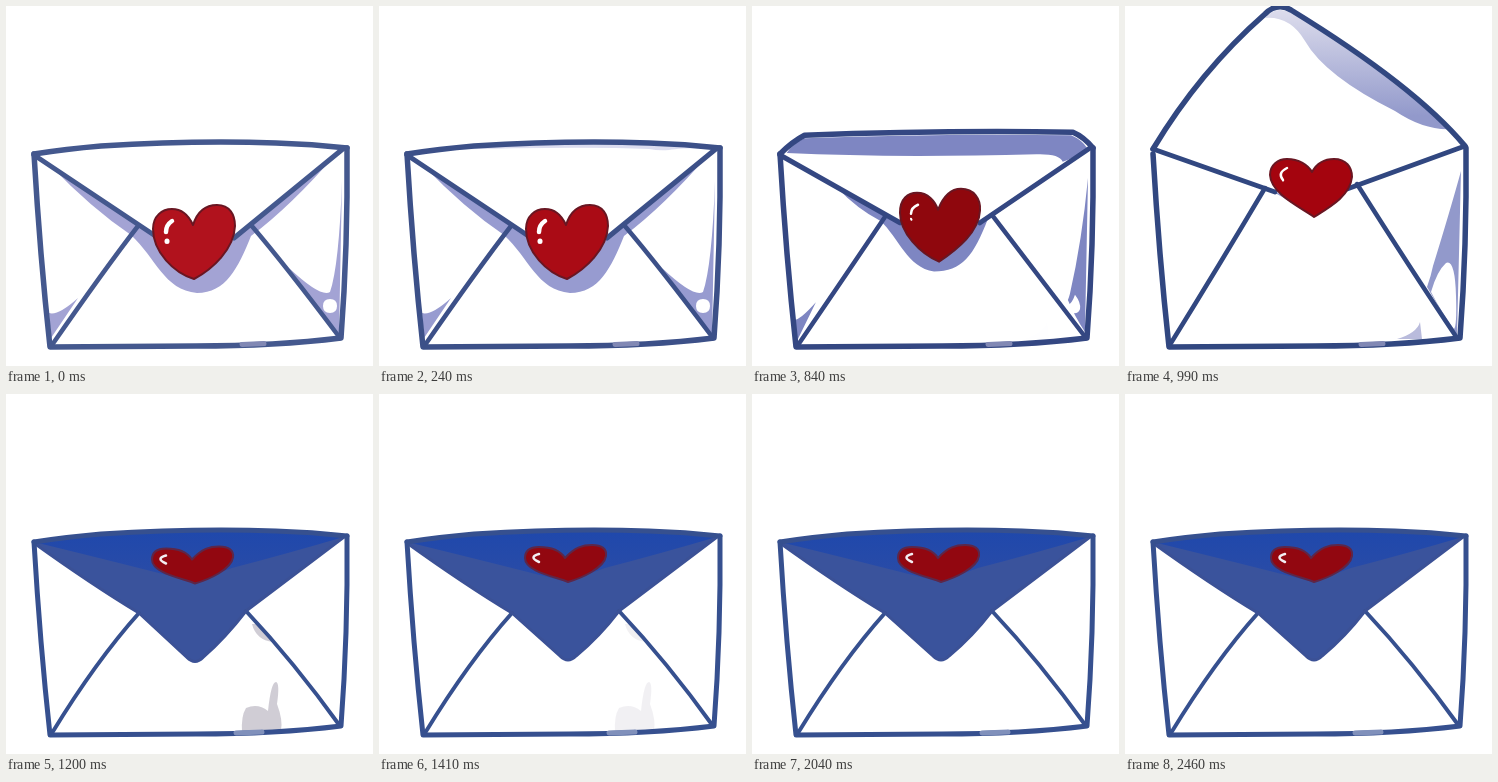
Animation, 367 px wide and 360 px high, one loop 2490 ms. Source, as an HTML page with a canvas:

```html
<!DOCTYPE html>
<html>
<head>
<meta charset="utf-8">
<style>
html, body { margin: 0; width: 100%; height: 100%; overflow: hidden; background: #fff; }
canvas { display: block; }
</style>
</head>
<body>
<canvas id="stage" width="367" height="360"></canvas>
<script>
const ctx = document.getElementById('stage').getContext('2d');
const LOOP = 2490, TURN = 1050;
ctx.lineCap = ctx.lineJoin = 'round';

// Blend every number in two strings of the same form.
function mix(a, b, p) {
  const to = b.match(/-?[\d.]+/g).map(Number);
  let i = 0;
  return a.replace(/-?[\d.]+/g, n => +(+n + (to[i++] - n) * p).toFixed(3));
}

function at(t, keys) {
  const next = keys.findIndex(k => k[0] > t);
  if (next < 0) return keys[keys.length - 1][1];
  if (!next) return keys[0][1];
  const [t0, a] = keys[next - 1], [t1, b] = keys[next];
  return mix(a, b, (t - t0) / (t1 - t0));
}

const pose = (shut, ajar, open) => [[775, shut], [840, ajar], [990, open]];
const tone = (first, late, ajar, open) => [[0, first], [540, late], [840, ajar], [990, open]];

const ink = tone('rgb(68,88,142)', 'rgb(51,70,128)', 'rgb(52,71,130)', 'rgb(49,71,128)');
const lilac = tone('rgb(163,163,212)', 'rgb(137,144,202)', 'rgb(126,134,194)', 'rgb(146,153,203)');
const red = tone('rgb(177,18,29)', 'rgb(162,3,12)', 'rgb(143,7,13)', 'rgb(164,4,14)');
const rim = 'rgb(105,22,34)';

const shutTop = 'M28 148Q60 143 95 140Q190 134 270 137Q306 138 341 142';
const topEdge = pose(
  shutTop,
  'M28 148Q40 136 52 130Q190 125 322 127Q332 131 341 142',
  'M28 143Q75 65 140 8Q152 -4 166 4Q290 80 340 140');
const inside = pose(
  'M60 144Q80 142 100 141Q190 137 270 139Q300 140 325 142Q300 142 290 144Q280 145 270 143Q200 140 60 144Z',
  'M34 148Q40 138 52 133Q190 128 320 130Q330 134 335 142Q320 154 311 156Q308 148 285 149Q140 153 34 148Z',
  'M140 12Q148 3 156 4Q165 5 180 14Q290 85 327 123Q300 125 270 105Q200 70 180 35Q165 10 140 12Z');
const flap = pose(
  'M28 149L148 229M338 142L228 232',
  'M28 149L148 217M338 142L228 217',
  'M28 143L150 186M340 140L222 183');
const flapShade = pose(
  'M45 160L148 229L188 250L228 232L330 148Q285 200 245 230C232 262 220 287 191 287C158 284 150 252 125 229Q85 202 45 160Z',
  'M85 182L148 217L188 235L228 217L265 192Q250 206 236 213C222 250 210 266 182 266C155 262 147 232 128 215Q105 203 85 182Z',
  'M140 182L150 186L188 200L222 183L232 178Q228 181 222 184C210 194 200 206 189 208C170 200 160 192 150 187Q145 185 140 182Z');
const seams = pose(
  'M46 339Q98 264 132 220M245 219Q280 260 334 332',
  'M46 339Q98 263 133 211M240 209Q285 268 334 332',
  'M46 337Q95 258 140 182M232 178Q285 262 332 332');
const sideShade = pose(
  'M283 262Q315 292 324 286Q333 260 336 175L333 330Q305 292 283 262Z',
  'M316 294Q317 292 318 288Q330 235 336 172L333 326Q322 309 316 294Z',
  'M302 281Q306 270 308 260Q325 205 336 165L332 330Q316 305 302 281Z');
const sideGap = pose(
  'M324 293Q331 293 331 300Q331 307 324 307Q317 307 317 300Q317 293 324 293Z',
  'M323 289Q329 297 328 303Q326 308 321 307Q316 305 316 299Q320 298 323 289Z',
  'M321 257Q330 253 331 290Q332 320 329 323Q318 309 306 286Q312 265 321 257Z');
const cornerShade = pose(
  'M43 307Q52 310 72 292L45 332Z',
  'M42 314Q48 314 64 296L45 335Z',
  'M44 335Q45 335 46 334L45 337Z');
const heart = pose(
  'M187 219C193 200 205 199 211 199C224 199 229 209 229 220C228 243 207 263 188 273C168 267 147 246 147 223C147 210 156 203 166 203C176 203 183 210 187 219Z',
  'M186 204C193 186 203 183 209 183C222 183 229 193 228 205C227 226 206 243 187 256C168 248 148 227 148 207C148 193 156 187 165 187C176 187 183 195 186 204Z',
  'M187 166C193 155 202 153 209 153C221 153 227 161 227 171C225 190 205 201 189 211C175 201 146 188 145 169C145 159 153 153 162 153C174 153 183 159 187 166Z');
const flatHeart = 'M186 164C196 153 204 151 213 151C223 151 228 155 227 162C225 174 203 184 189 188C178 183 146 178 146 164C146 155 153 153 160 153C172 153 181 156 186 164Z';
const shine = pose('M160 226Q160 219 166 215', 'M159 208Q159 202 166 199', 'M158 174Q152 167 162 162');
const glint = pose('M161 235L161 235.5', 'M159 213L159.5 214', 'M158 174L158 174.5');
const sides = 'M341 142Q342 240 335 332Q270 340 190 340L44 341Q34 250 28 148';

function fill(path, color) {
  ctx.fillStyle = color;
  ctx.fill(new Path2D(path));
}
function line(path, color, width) {
  ctx.strokeStyle = color;
  ctx.lineWidth = width;
  ctx.stroke(new Path2D(path));
}
function faded(alpha, draw) {
  ctx.globalAlpha = Math.max(0, Math.min(1, alpha));
  draw();
  ctx.globalAlpha = 1;
}
function fade(from, to, y0, y1) {
  const gradient = ctx.createLinearGradient(0, y0, 0, y1);
  gradient.addColorStop(0, from);
  gradient.addColorStop(1, to);
  return gradient;
}

function drawFront(t) {
  const get = keys => at(t, keys);
  const dark = get(ink), pale = get(lilac);

  faded(t / 700, () =>
    fill(get(inside), t < 900 ? pale : fade('#dcdcec', pale, 5, 110)));
  fill(get(flapShade), pale);
  fill(get(sideShade), pale);
  fill(get(sideGap), '#fff');
  fill(get(cornerShade), pale);
  faded(Math.min((t - 250) / 290, (840 - t) / 200), () =>
    fill('M104 318Q140 324 210 327Q270 334 325 331L300 338L122 338Q117 328 104 318Z', '#bdbdcd'));
  faded((t - 840) / 150, () => fill('M272 333Q292 327 295 316L297 333Z', '#b9bbdc'));

  line(get(seams), dark, 4.5);
  line(get(flap), dark, 5);
  line(get(topEdge), dark, 5.5);
  line(sides, dark, 5.5);
  line('M236 338.5L258 337.5', '#8188b4', 5);
  fill(get(heart), get(red));
  line(get(heart), rim, 2);
  line(get(shine), '#fff', t < 800 ? 4.5 : 2.5);
  line(get(glint), '#fff', t < 800 ? 5 : 2);
}

function drawBack(t) {
  const dark = '#36508f';
  const drop = t < 1400 ? 1.5 : 0;
  const tip = `M28 149Q85 190 133 219L181 ${262 + drop}Q189 ${270 + drop} 197 ${262 + drop}Q220 243 240 217L338 143`;

  faded((1500 - t) / 300, () => {
    fill('M236 338Q235 322 240 314Q252 309 262 317Q265 288 270 288Q274 289 271 310Q277 326 275 336Z', '#d0cdd5');
    fill('M246 230L252 230L267 248Q250 246 246 230Z', '#d0cdd5');
  });
  fill(tip + 'Q306 138 270 137Q190 134 95 140Z', '#3a539c');
  fill(shutTop + 'Q280 160 226 174L188 188Q110 168 28 148Z', fade('#1f48ac', '#2b4ca6', 137, 188));
  line('M46 339Q90 267 133 219M240 217Q288 268 334 332', dark, 4);
  line(tip, '#3b5196', 3);
  line(shutTop, dark, 5);
  line(sides, dark, 5);
  line('M230 339L256 338', '#8090bb', 5);

  ctx.save();
  ctx.translate(0, drop);
  fill(flatHeart, '#920710');
  line(flatHeart, '#5d2749', 2);
  line('M160 160Q149 163 160 168', '#f3eef2', 2.5);
  ctx.restore();
}

function frame(now) {
  const t = now % LOOP;
  ctx.fillStyle = '#fff';
  ctx.fillRect(0, 0, 367, 360);
  (t < TURN ? drawFront : drawBack)(t);
  requestAnimationFrame(frame);
}
frame(0);
</script>
</body>
</html>
```
